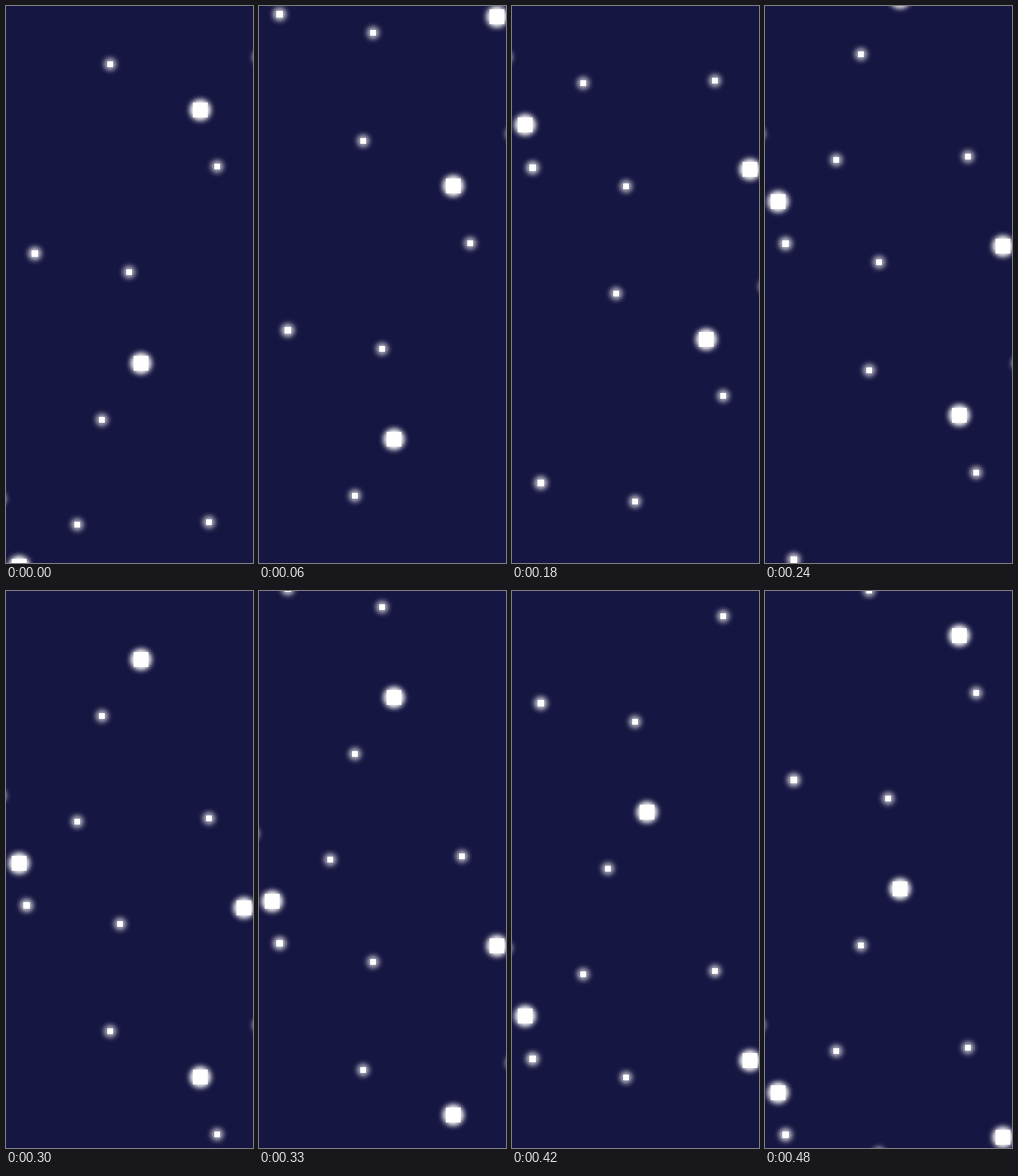
Recreate the animation shown at these times as an HTML page. Size 300 by 675 pixels, loop 0.51 s.

```html
<!DOCTYPE html>
<html lang="en">
<head>
<meta charset="utf-8">
<title>Falling stars</title>
<style>
html, body { margin: 0; width: 100%; height: 100%; overflow: hidden; background: #161642; }
svg { display: block; width: 300px; height: 675px; }
</style>
</head>
<body>
<svg id="sky" viewBox="0 0 300 675">
  <defs>
    <filter id="blur" x="-100%" y="-100%" width="300%" height="300%" color-interpolation-filters="sRGB">
      <feGaussianBlur stdDeviation="3.2"/>
    </filter>
  </defs>
</svg>
<script>
const STEP = 30, LOOP = 510;
const SPEED = 46.35;   // pixels per step
const PERIOD = 813;    // height of the repeating field
const MARGIN = 50;     // room above the stage for the glow

// Each layer: star size, glow opacity and the centres at time 0
const layers = [
  { size: 18, glow: 1, at: [[236, 125.5], [164, 432.5], [16, 679], [289, 733]] },
  { size: 8, glow: 0.8, at: [[35, 300], [25, 730.6], [308, 62], [-8, 597]] },
  { size: 7, glow: 0.72, at: [[126.5, 70.4], [256.5, 194.5], [149, 322.7], [116.5, 501],
                             [86.5, 628.6], [246, 625], [138.5, 753.1]] }
];

const sky = document.getElementById('sky');

function add(parent, name, attrs = {}) {
  const el = document.createElementNS('http://www.w3.org/2000/svg', name);
  for (const key in attrs) el.setAttribute(key, attrs[key]);
  return parent.appendChild(el);
}

function makeStar([x, y], size, glow) {
  const node = add(sky, 'g', { fill: '#fff' });
  const mid = size / 2;
  add(node, 'circle', { cx: mid, cy: mid, r: mid + 4, opacity: glow, filter: 'url(#blur)' });
  add(node, 'rect', { width: size, height: size, 'shape-rendering': 'crispEdges' });
  return { node, left: Math.round(x - mid), y, mid };
}

const stars = layers.flatMap(({ size, glow, at }) => at.map(p => makeStar(p, size, glow)));

function draw(time) {
  const step = Math.floor((time % LOOP) / STEP + 0.001);
  for (const { node, left, y, mid } of stars) {
    const now = (y + step * SPEED + MARGIN) % PERIOD - MARGIN;
    node.setAttribute('transform', `translate(${left} ${Math.round(now - mid)})`);
  }
}

const start = performance.now();
function tick() {
  draw(performance.now() - start);
  requestAnimationFrame(tick);
}
tick();
</script>
</body>
</html>
```
